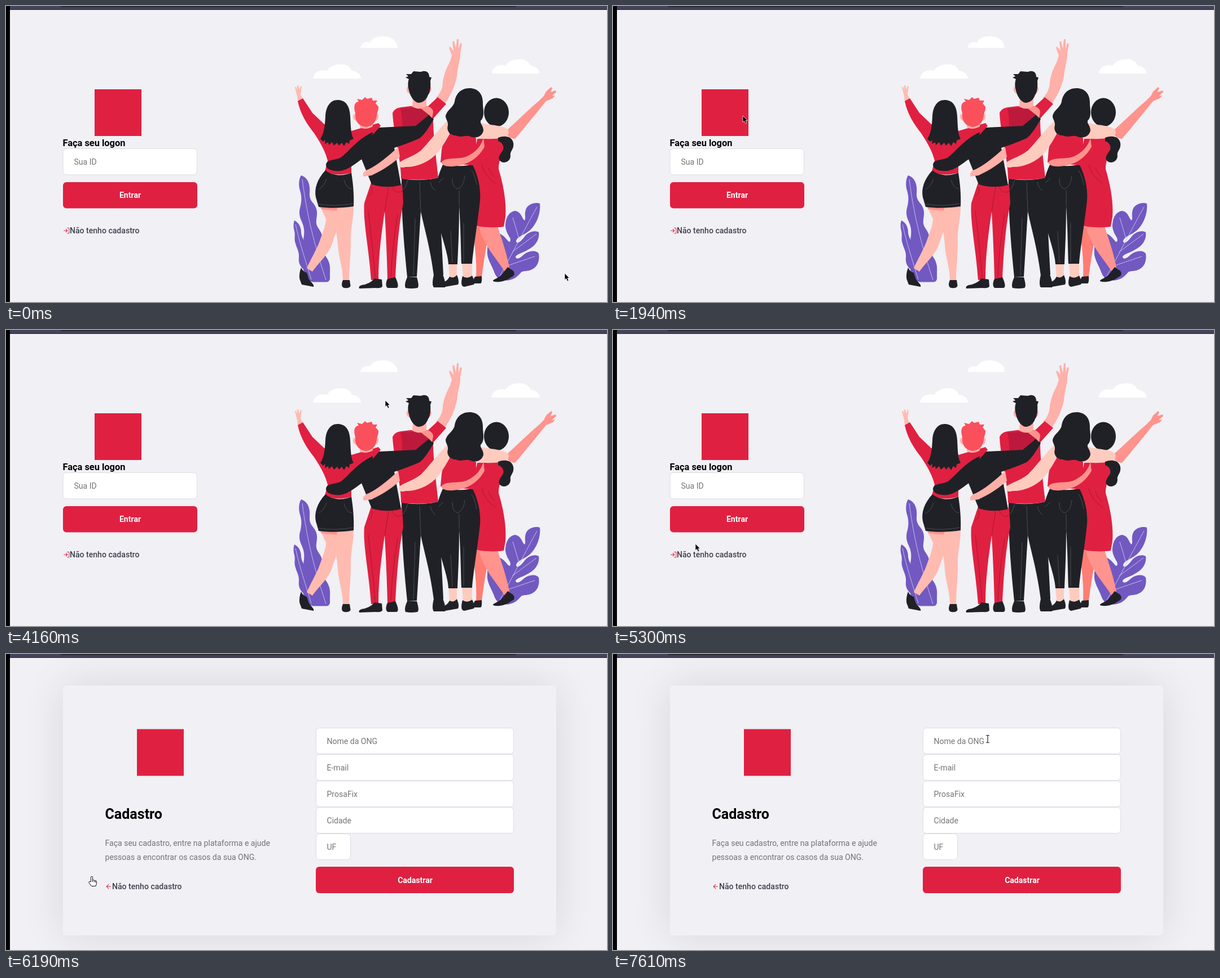
These frames come from a looping animation (1065 px wide and 526 px high, 8 s). An HTML page:

```html
<!DOCTYPE html>
<html lang="pt-BR">
<head>
<meta charset="utf-8">
<title>Cadastro</title>
<style>
html, body { margin: 0; width: 100%; height: 100%; overflow: hidden; background: #f0f0f5; }
svg { display: block; width: 1065px; height: 526px; font-family: Roboto, sans-serif; }
text { font-size: 14.06px; fill: #757575; }
.b { font-weight: 700; fill: #000; }
.link { font-weight: 500; fill: #41414d; }
.cta { font-weight: 700; fill: #fff; text-anchor: middle; }
.field { fill: #fff; stroke: #dcdce6; }
.icon { fill: none; stroke: #e02041; stroke-width: 2; stroke-linecap: round; stroke-linejoin: round; }
.k { fill: #202126; }
.r { fill: #e02041; }
.d { fill: #bd193c; }
.p { fill: #7159c1; }
.s1 { fill: #ffbbb0; }
.s2 { fill: #ffb0a8; }
.s3 { fill: #fecbbf; }
.s4 { fill: #ff938d; }
.fine { fill: none; stroke: #56565d; stroke-width: .8; }
.seam { fill: none; stroke: #a3172f; stroke-width: .9; }
.vein { fill: none; stroke: #cfc5ee; stroke-width: .9; }
</style>
</head>
<body>
<svg viewBox="0 0 1065 526">
<defs>
  <filter id="blur" x="-30%" y="-50%" width="160%" height="200%"><feGaussianBlur stdDeviation="39"/></filter>
  <path id="cloud" fill="#fff" d="M544 129C545 117 556 112 569 115C574 106 584 103 595 103.500C606 104 611 110 613 115C622 116 629 121 629 129Z"/>
</defs>
<rect width="1065" height="526" fill="#f0f0f5"/>

<g id="login">
  <rect class="r" x="157" y="148" width="83" height="83"/>
  <text class="b" x="100.500" y="249" style="font-size:16.400px">Faça seu logon</text>
  <rect class="field" x="101" y="253.500" width="237.500" height="46.500" rx="6"/>
  <text x="120.500" y="281.500">Sua ID</text>
  <rect id="enter" x="101" y="313" width="238" height="46.500" rx="6"/>
  <text class="cta" x="220" y="341">Entrar</text>
  <path class="icon" transform="translate(101 393) scale(.52)" d="M15 3h4a2 2 0 0 1 2 2v14a2 2 0 0 1-2 2h-4M10 17l5-5-5-5M15 12H3"/>
  <text class="link" x="113" y="404">Não tenho cadastro</text>

  <use href="#cloud"/>
  <use href="#cloud" x="316.500" y="-9"/>
  <path fill="#fff" d="M628 74.500C629 66 637 62 645 65C649 56 660 53 671 54C684 55 694 63 694 74.500Z"/>

  <!-- plants -->
  <path class="p" d="M523 301C530 303 537 310 538 322C539 333 536 337 541 346C547 354 552 359 551 371C550 382 548 386 553 394C559 403 562 408 560 420C558 430 560 435 566 444C573 453 575 462 574 473V485Q573 491 566 490.500H545C535 489 528 480 530 465C536 450 537 445 533 436C528 425 526 418 528 408C529 398 528 392 524 383C519 372 519 365 522 355C524 345 524 338 521 328C518 318 519 307 523 301Z"/>
  <path class="p" d="M511 381C519 385 523 393 523 403C524 413 530 418 533 427L545 470L550 490H545C535 489 528 480 527 468C521 462 518 456 519 447C520 437 515 430 513 422C510 414 513 408 511 400C509 393 509 387 511 381Z"/>
  <path class="vein" d="M525 308C533 370 545 420 567 487M513 388C520 420 530 450 541 486"/>
  <path class="p" d="M946 351C938 348 924 352 921 362C918 372 922 376 919 381C914 378 914 366 902 364C890 366 885 378 885 392C887 408 897 412 893 419C889 420 886 410 876 405C862 402 853 418 853 434C851 448 861 460 866 475Q869 483 878 487C895 490 905 483 912 474C916 469 925 473 934 467C943 462 946 450 944 440C940 433 925 434 915 444C908 450 904 450 903 446C905 440 915 440 930 430C940 424 946 412 944 402C937 398 925 401 918 411C912 419 905 424 904 418C906 409 916 409 929 398C940 388 948 368 946 351Z"/>
  <path class="vein" d="M941 357C920 395 905 425 874 482M898 376L909 413M940 405L897 437M866 414L885 461M937 445L887 462"/>

  <!-- woman in dress -->
  <path class="s4" style="fill:#ff7d73" d="M828 391L858 393C852 420 847 450 843 481L833 482C835 450 829 420 828 391Z"/>
  <path class="s4" d="M838 391L871 391C876 408 885 430 892 464L883 471C872 452 845 425 838 391Z"/>
  <path class="k" d="M831 481L843 480Q844 492 841 493H829Q827 487 831 481ZM889 464L898 470C903 475 901 480 895 482C885 490 870 492 863 489C862 486 872 484 878 478Z"/>
  <path class="r" d="M835 236L885 234C883 255 872 275 873 290C882 320 887 350 885 375L882 392C865 395 840 393 825 389C830 370 839 350 840 330L826 280Z"/>
  <path class="seam" d="M843 282Q848 302 867 315M855 287Q858 297 866 304"/>
  <path class="s4" d="M884 224C905 205 925 185 945 168L953 160L957 152L966 144L968 146L965 153L974 150L975 153L967 160L973 159L969 164L957 169C940 190 920 215 902 236C895 236 889 232 884 224Z"/>
  <ellipse class="k" cx="869" cy="189" rx="22" ry="25.500"/>

  <!-- tall man -->
  <path class="s2" d="M787 98L790 88L785 74L787 72L793 80L791 64L794 62L797 76L799 59L802 59L802 76L805 66L808 67L805 84C806 92 800 110 799 125C795 145 787 160 778 173L762 163C770 155 774 145 774 135C776 120 782 108 787 98Z"/>
  <path class="k" d="M701 306C720 311 745 310 766 305L775 478L758 479C752 430 740 390 735 365L728 481L711 482C706 430 700 370 701 306Z"/>
  <path class="fine" d="M733 313L735 365M712 308Q708 324 703 327M725 377L722 479M752 313Q755 328 765 329"/>
  <path class="r" d="M685 190C688 184 692 181 700 180L716 178H748L765 162L780 174L757 200C757 230 762 270 766 305C745 310 720 309 700 307C700 270 687 230 685 190Z"/>
  <path class="d" d="M699 182C703 200 702 210 702 217L728 215L750 197L746 180Z"/>
  <path class="s2" d="M721 165H745V179Q733 186 720 179ZM715 143C708 141 708 153 715 156ZM750 143C755 141 756 152 749 156Z"/>
  <path class="k" d="M714 150C711 140 713 132 714 130L708 127L713 125L709 121L718 121L722 116L735 117C747 113 750 120 750 126L754 127L752 133C753 145 751 155 748 158C745 167 738 172 731 172C723 171 716 160 714 150Z"/>
  <path class="k" d="M711 482H728Q733 499 729 501Q718 503 708 501Q705 495 711 482ZM758 478L774 477Q781 496 778 500H758Q754 495 758 478Z"/>

  <!-- woman with wavy hair -->
  <path class="s3" d="M784 455H799V484H786ZM808 455H826V484H810Z"/>
  <path class="k" d="M777 276C790 286 810 286 826 281C834 295 842 320 840 345C836 385 828 430 826 458H807C806 430 806 400 803 355C803 400 801 435 800 459H784C783 430 758 380 760 335C762 310 770 290 777 276Z"/>
  <path class="fine" d="M791 306Q790 322 800 325Q811 322 813 302M766 314L775 306M803 327V355M834 318Q831 300 825 292M811 385V455M788 400L791 456"/>
  <path class="k" d="M786 481Q793 485 799 478Q804 490 801 495L778 499Q768 497 773 492Q782 489 786 481ZM809 480Q817 486 826 479Q832 491 829 495L812 499Q804 498 809 480Z"/>
  <path class="r" d="M779 220L833 228V255L826 283L770 278L772 255Z"/>
  <path class="s4" d="M846 234C842 250 830 262 815 268C800 273 780 268 772 277C770 284 785 287 800 284C825 280 840 265 848 250Z"/>
  <path class="s3" d="M843 208C860 212 880 212 889 219C894 226 888 234 880 234C865 237 845 237 831 234L834 217Z"/>
  <path class="k" d="M872 234C885 229 897 232 899 243C901 255 892 258 894 266C894 276 884 280 878 277C870 272 874 266 878 260C885 250 880 243 872 240Z"/>
  <path class="s3" d="M784 203C772 212 750 242 735 257C722 267 705 272 697 278C695 285 700 289 708 286C725 287 745 278 755 270C768 260 778 242 786 228Z"/>
  <path class="k" d="M822 146C805 146 797 157 795 170C793 180 782 184 779 195C779 202 784 205 783 212C780 222 787 230 797 230C808 235 815 228 823 232C834 236 843 232 846 222C846 212 840 210 841 204C848 198 846 186 845 176C846 160 840 147 822 146Z"/>

  <!-- man with red trousers -->
  <path class="r" d="M647 314C665 322 685 321 702 316L704 350C698 380 693 420 690 485L676 486C675 440 673 400 671 365C666 400 660 440 660 486L647 487C643 430 632 380 635 350Z"/>
  <path class="seam" d="M671 365L678 322M648 321Q651 334 642 338M684 321Q690 336 702 329M642 364Q650 430 654 482M694 370Q684 430 682 481"/>
  <path class="k" d="M653 484L666 486L667 498Q665 502 655 501L626 502Q624 498 630 496Q645 494 653 484ZM676 485L690 482C694 490 697 500 692 501H677C672 500 673 490 676 485Z"/>
  <path class="k" d="M661 216L726 213L750 193L758 201C750 215 742 228 733 235C715 243 700 248 688 252L700 318C683 323 663 322 648 317L626 262C622 250 630 235 661 216Z"/>
  <path class="s4" d="M735 182L748 178Q757 182 757 189L755 199L749 193Z"/>
  <path class="s2" d="M695 251L698 268C680 285 660 295 648 301L634 303C630 298 636 292 643 290C660 282 680 264 695 251Z"/>

  <!-- woman with skirt -->
  <path class="s1" d="M517 170L516 160L512 145L514 143L516 149L516 141L518 141L520 149L522 142L524 143L522 157L526 166Z"/>
  <path class="r" d="M517 169L526 164L543 190L564 210L612 222L660 208L664 213L640 240L612 272V296C595 302 575 300 565 294L570 275C565 255 555 240 546 226C533 210 521 190 517 169Z"/>
  <path class="k" d="M650 224C620 238 605 262 592 270C580 275 569 272 567 282C567 291 580 294 592 293C610 291 625 274 646 262Z"/>
  <path class="s2" d="M619 191C613 192 614 203 621 204ZM657 191C662 191 661 203 655 204ZM627 205H650V214Q638 221 627 216Z"/>
  <path fill="#fa505c" d="M619 190C615 178 618 170 625 170L622 165L631 167L636 162L640 165L648 163L650 168L658 168L655 173L660 179C660 187 657 190 657 195C655 207 650 213 638 215C627 214 620 207 619 197Z"/>
  <path class="k" d="M589 167C576 166 567 177 566 196C565 215 563 228 557 236L562 241L566 238L565 245L571 242L572 247L578 242L581 248L587 243L590 248L595 243L599 249L603 242L608 245L609 239L616 236C611 228 611 215 610 196C609 177 602 168 589 167Z"/>
  <path class="s1" d="M556 355L604 356C595 380 585 400 578 422C573 440 555 455 543 472L533 466C540 450 549 435 555 420C560 405 567 390 567 378Z"/>
  <path class="s4" d="M555 355L602 357L597 364Q575 364 559 361Z"/>
  <path class="s1" d="M588 356L616 355C616 380 610 395 611 420C611 445 608 465 608 488H597C597 465 589 445 588 425C587 405 580 385 588 356Z"/>
  <path class="k" d="M566 292C551 308 546 325 549 340L554 357C575 360 597 359 616 356C617 335 615 315 612 296C598 303 578 302 566 292Z"/>
  <path class="fine" d="M553 352Q584 357 615 351M599 309Q603 324 613 325M568 307Q565 319 554 326"/>
  <path class="k" d="M523 465C520 472 519 482 521 487L524 495L545 499C547 496 540 490 537 486L533 474Q526 472 523 465ZM597 487C594 494 594 500 600 501C608 502 612 499 610 494L609 487Z"/>
</g>

<g id="signup">
  <rect x="101" y="56" width="874" height="444" rx="6" opacity=".1" filter="url(#blur)"/>
  <rect x="101" y="56" width="874" height="444" rx="6" fill="#f0f0f5"/>
  <rect class="r" x="232" y="133.500" width="83" height="83"/>
  <text class="b" x="175.500" y="292.500" style="font-size:25px">Cadastro</text>
  <g style="--c:#737380">
    <text x="175.500" y="341">Faça seu cadastro, entre na plataforma e ajude</text>
    <text x="175.500" y="366">pessoas a encontrar os casos da sua ONG.</text>
  </g>
  <path class="icon" transform="translate(175.500 407) scale(.52)" d="M19 12H5M12 19l-7-7 7-7"/>
  <text class="link" x="188" y="418">Não tenho cadastro</text>
  <g id="fields"></g>
  <rect class="r" x="549" y="378" width="351" height="47" rx="6"/>
  <text class="cta" x="725" y="406.500">Cadastrar</text>
</g>

<rect x="7" width="1058" height="6" fill="#45435a"/>
<rect x="7" y="6" width="1058" height="1" fill="#2c2b38"/>
<path d="M96 0H905Q904 2 900 2H101Q97 2 96 0Z" fill="#2b2a33"/>
<rect width="7" height="526"/>

<g id="pointer">
  <path id="arrow" d="M0 0V11.500L2.700 9.200L4.800 14L7 13L5 8.500H8.500Z" stroke="#fff" stroke-width=".7"/>
  <path id="hand" d="M-1.500 9V.8Q-1.500-.8 0-.8T1.500 .8V6Q3.500 4.500 4.300 6.500Q6 5.200 6.700 7.200Q8 6.400 8.300 8.300V12.500L7 16.500H-.5L-5 10.500Q-5.500 8 -3.500 8.200ZM1.500 6V9M4.300 6.500V9.500M6.700 7.200V10" fill="#fff" stroke="#111"/>
  <path id="beam" d="M-3-6.500H-1Q0-6.500 0-5.500V5.500Q0 6.500 -1 6.500H-3M3-6.500H1Q0-6.500 0-5.500M3 6.500H1Q0 6.500 0 5.500" fill="none" stroke="#222" stroke-width="1.200"/>
</g>
</svg>
<script>
const $ = id => document.getElementById(id);
const LOOP = 8000, STEP = 50, SWITCH = 6200;

$("fields").innerHTML = ["Nome da ONG", "E-mail", "ProsaFix", "Cidade", "UF"].map((label, i) => {
  const y = 131.5 + i * 47;
  return `<rect class="field" x="549.500" y="${y}" width="${i < 4 ? 350 : 61}" height="46" rx="6"/>
    <text x="568.500" y="${y + 28}">${label}</text>`;
}).join("");

// pointer path: time, x, y
const path = [
  [0, 990, 475], [200, 975, 500], [350, 940, 506], [550, 880, 470], [650, 862, 446],
  [800, 856, 455], [850, 856, 455], [1050, 640, 300], [1250, 330, 110], [1400, 162, 33],
  [1700, 162, 33], [1950, 230, 195], [2100, 224, 250], [2300, 215, 312], [2500, 210, 340],
  [2550, 210, 340], [2800, 214, 375], [3100, 211, 398], [3300, 211, 398], [3600, 283, 295],
  [3850, 600, 200], [4000, 734, 168], [4100, 728, 156], [4150, 672, 125], [4250, 740, 56],
  [4350, 880, 90], [4450, 952, 230], [4550, 900, 380], [4620, 780, 426], [4750, 520, 390],
  [4900, 284, 299], [4950, 284, 301], [5050, 240, 335], [5150, 190, 365], [5300, 146, 380],
  [5500, 141, 388], [5700, 152, 393], [5850, 152, 393], [6150, 152, 396], [6200, 152, 396],
  [6400, 330, 310], [6600, 542, 220], [6650, 542, 220], [6900, 617, 153], [7050, 617, 153],
  [7150, 624, 153], [7300, 624, 153], [7600, 664, 151], [8000, 664, 151]
];

function place(t) {
  const i = Math.max(1, path.findIndex(k => k[0] >= t));
  const [t0, x0, y0] = path[i - 1], [t1, x1, y1] = path[i];
  const f = Math.max(0, (t - t0) / (t1 - t0));
  return [x0 + (x1 - x0) * f, y0 + (y1 - y0) * f];
}

const inside = ([x, y], l, t, r, b) => x >= l && x <= r && y >= t && y <= b;
const onEnter = t => t < SWITCH && inside(place(t), 101, 313, 339, 359);

function shape(t) {
  const p = place(t);
  // the shape is refreshed one step after the page
  if (t <= SWITCH) {
    if (onEnter(t) || inside(p, 101, 391, 236, 407)) return "hand";
    return inside(p, 101, 253, 339, 300) ? "beam" : "arrow";
  }
  return inside(p, 549, 131, 900, 319) ? "beam" : "arrow";
}

function draw(now) {
  const t = Math.floor(((now % LOOP) + 20) / STEP) * STEP;
  const second = t >= SWITCH;
  $("login").style.display = second ? "none" : "";
  $("signup").style.display = second ? "" : "none";

  const [x, y] = place(Math.min(t, LOOP));
  $("pointer").setAttribute("transform", `translate(${x} ${y})`);
  const kind = shape(Math.min(t, LOOP));
  for (const id of ["arrow", "hand", "beam"]) $(id).style.display = id === kind ? "" : "none";

  // 200 ms hover fade to 90% brightness
  const hover = [0, 1, 2, 3].filter(k => onEnter(Math.max(0, t - k * STEP))).length / 4;
  const dim = 1 - hover * 0.1;
  $("enter").style.fill = `rgb(${224 * dim}, ${32 * dim}, ${65 * dim})`;
}

const start = performance.now();
function tick() {
  draw(performance.now() - start);
  requestAnimationFrame(tick);
}
draw(0);
requestAnimationFrame(tick);
</script>
</body>
</html>
```
